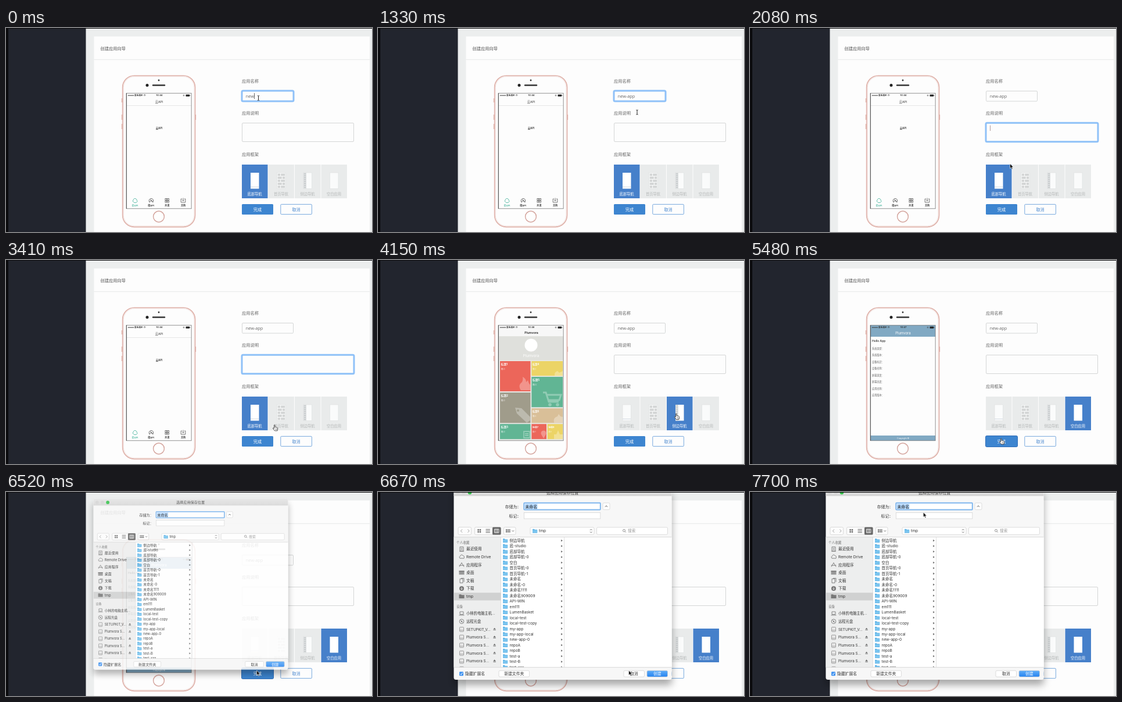
An HTML page for the animation above (8 s loop, 630x351 px).

```html
<!DOCTYPE html>
<html lang="en">
<head>
<meta charset="utf-8">
<title>App wizard</title>
<style>
html, body { margin: 0; width: 100%; height: 100%; overflow: hidden; background: #eceeee; }
svg { display: block; width: 630px; height: 351px; }
text { font-family: Inter, "Noto Sans CJK SC", "Noto Sans CJK", "Noto Sans CJK JP", sans-serif; white-space: pre; }
.field { font-family: "Open Sans", "Noto Sans", sans-serif; }
.box { fill: #fdfdfd; stroke: #d4d6d6; stroke-width: 1; }
.glow { fill: none; stroke: #8fc1f8; stroke-width: 3; }
.tab .bg { fill: #e9ebeb; }
.tab .name { fill: #b4b7b7; }
.tab .paper { fill: #fafbfb; stroke: #dfe1e1; stroke-width: .7; }
.tab.on .bg { fill: #4680ca; }
.tab.on .name, .tab.on .paper { fill: #fff; }
.tab.on .paper { stroke: none; }
</style>
</head>
<body>
<svg id="stage" viewBox="0 0 630 351" xmlns="http://www.w3.org/2000/svg"></svg>
<script>
const LOOP = 8000;
const stage = document.getElementById('stage');

// Markup helpers; text is placed by its vertical centre.
const rect = (x, y, w, h, fill, more = '') =>
  `<rect x="${x}" y="${y}" width="${w}" height="${h}" fill="${fill}" ${more}/>`;
const circle = (x, y, r, fill, more = '') => `<circle cx="${x}" cy="${y}" r="${r}" fill="${fill}" ${more}/>`;
const text = (x, y, size, str, fill = '#555', more = '') =>
  `<text x="${x}" y="${y + size * .37}" font-size="${size}" fill="${fill}" ${more}>${str}</text>`;
const line = (d, stroke, width = 1, more = '') =>
  `<path d="${d}" fill="none" stroke="${stroke}" stroke-width="${width}" ${more}/>`;
const shape = (d, fill, more = '') => `<path d="${d}" fill="${fill}" ${more}/>`;
const group = (id, body, more = '') => `<g id="${id}" ${more}>${body}</g>`;
const MID = 'text-anchor="middle"', BOLD = 'font-weight="600"', END = 'text-anchor="end"';
const BRAND = 'Plumvora';

/* ---------- phone ---------- */
function statusBar(time) {
  let s = '';
  for (let i = 0; i < 5; i++) s += circle(210.8 + i * 2.1, 116, .85, '#333');
  return s + text(221, 116, 3.6, '星禾通讯', '#333', BOLD) +
    line('M236.8 115.4q1.8-1.6 3.6 0M237.7 116.6q.9-.8 1.8 0', '#333', .7) +
    text(264, 116, 4, time, '#222', MID + ' ' + BOLD) +
    circle(306, 116, 1, 'none', 'stroke="#444" stroke-width=".6"') +
    rect(309.5, 114.4, 6.6, 3.3, '#222', 'rx=".6"') + rect(316.5, 115.4, .8, 1.4, '#222');
}

function bottomScreen() {
  const green = '#4db6a0', grey = '#555';
  let s = rect(207, 112, 112, 199, '#fdfdfd') + statusBar('10:44') +
    text(263.5, 127, 5.2, '云API', '#333', MID) + line('M207 133.5h112', '#e2e2e2', .8) +
    text(263.5, 172, 4.4, '云API', '#333', MID + ' ' + BOLD);
  ['云API', '端API', '开发', '文档'].forEach((n, i) =>
    s += text(222 + i * 27.7, 305.3, 4.1, n, i ? '#333' : green, MID + ' ' + BOLD));
  s += line('M219.5 299.5q-2.5-1.5-.5-3.4q1-3.6 4.2-2.4q2.2 1 2 2.8q2 2 0 3l-1.4 1h-3z', green, .9);
  s += line('M247 300q-2.5-5.8 3-6.5q5.4.8 2.8 6.5l-2.8-3.2zM248 295.5l4.2 2.5', grey, .9);
  for (let i = 0; i < 4; i++)
    s += rect(274 + (i % 2) * 3.8, 293.4 + (i >> 1) * 3.8, 2.8, 2.8, 'none', `stroke="${grey}" stroke-width=".8"`);
  return s + line('M303 294h-1.8v6h7.6v-6H307M305 292.5v5M303.4 296l1.6 1.6l1.6-1.6', grey, .8);
}

function tile(x, y, w, h, fill, n, size = 4.6) {
  return rect(x, y, w, h, fill) + text(x + 1.8, y + 5, size, '标题' + n, '#fff', 'font-weight="700"') +
    text(x + 1.8, y + 13.5, size * .78, '简介', '#fff');
}

function gridScreen() {
  const red = '#ec665a', yellow = '#ecd466', green = '#61b594';
  const faint = 'opacity=".3"';
  return rect(207, 112, 112, 199, '#e9e9e6') + rect(207, 112, 112, 19, '#f7f7f7') + statusBar('10:46') +
    text(264, 125.2, 5.2, BRAND, '#222', MID + ' ' + BOLD) +
    rect(209, 131.5, 109.5, 41, '#dfe0dc') + circle(263.5, 146.5, 11, '#fff') +
    text(263.5, 164.5, 6.2, BRAND, '#fff', MID) +
    tile(210, 174, 52.5, 52, red, 1) + tile(264.3, 174, 53.7, 25.3, yellow, 4, 4.2) +
    tile(264.3, 201, 53.7, 52.3, green, 5) + tile(210, 228, 52.5, 52.4, '#a09c8b', 2) +
    tile(264.3, 255.2, 53.7, 25.2, '#d9bf98', 6, 4.2) + tile(210, 282.2, 52.5, 26, green, 3) +
    tile(264.3, 282.2, 25.7, 26, red, 7, 3.8) + tile(291.6, 282.2, 26.4, 26, yellow, 8, 3.8) +
    shape('M246 224q-6-8 2-14q2-4 1-9q6 3 6 9l3-3q1 5 4 8v9z', '#fff', faint) +
    shape('M304 199q-1-6 5-8l3 3l6-3v8z', '#fff', faint) +
    line('M284 228h5l5 16h17M290 232h25l-3 9h-19', '#fff', 3, faint) +
    circle(296, 249, 2.8, '#fff', faint) + circle(309, 249, 2.8, '#fff', faint) +
    shape('M236 254l11 1l15 15v6l-6 4l-17-16z', '#fff', faint) + circle(241, 259, 2, '#a09c8b') +
    shape('M303 280q-2-9 6-11l2-4l3 4l4 1v10z', '#fff', faint) +
    line('M251 295h10v11h-10zM253 299h6M253 302h6', '#fff', 1.8, faint) +
    shape('M285 307l-4-7a4.5 4.5 0 1 1 8 0z', '#fff', faint) +
    shape('M303 308v-8h4l3-7l3 7h5v8z', '#fff', faint);
}

function sideScreen() {
  let s = rect(207, 112, 94, 199, '#dcdddc') + rect(301, 112, 18, 199, '#fdfdfd') +
    rect(301, 112, 18, 19, '#efefef') + line('M300.8 112v199', '#aaa', 1) + statusBar('10:47') +
    line('M303.8 122.6h5.6M303.8 125h5.6M303.8 127.4h5.6', '#555', .8);
  ['首页', '频道1', '频道2', '频道3', '频道4', '频道5'].forEach((n, i) =>
    s += text(219.5, 126 + i * 14.7, 4.7, n, '#333', BOLD));
  return s;
}

function blankScreen() {
  let s = rect(207, 112, 112, 199, '#fdfdfd') + rect(207, 112, 112, 20, '#81a9c3') + statusBar('10:47') +
    text(263.5, 125.5, 6, BRAND, '#fff', MID) + text(210, 139.5, 5, 'Hello App', '#444', BOLD);
  ['系统类型：', '系统版本：', '设备标识：', '设备名称：', '屏幕宽度：', '屏幕高度：', '应用名称：', '应用版本：']
    .forEach((n, i) => s += text(210, 152 + i * 11.5, 4.2, n, '#666'));
  return s + rect(207, 302, 112, 9, '#81a9c3') + text(263.5, 306.5, 3.6, 'Copyright ©', '#fff', MID);
}

function phone() {
  const pink = '#dfb0a8';
  return line('M199.6 121v7M199.6 149v9M199.6 165v9M326.4 149v9', pink, 1.4) +
    rect(200.7, 82, 124.8, 260.3, '#fdfdfd', `rx="20" stroke="${pink}" stroke-width="1.7"`) +
    rect(202.4, 83.7, 121.4, 256.9, 'none', 'rx="18.5" stroke="#f2e4e1" stroke-width="1"') +
    circle(263, 90, 1.4, '#333') + circle(243, 98.5, 2.5, '#222') +
    line('M253 98.5h20', '#333', 2.4, 'stroke-linecap="round"') +
    circle(263, 324.5, 9.4, '#fefefe', 'stroke="#d5a69f" stroke-width="1.5"') +
    `<g clip-path="url(#screen)">` +
    [bottomScreen, gridScreen, sideScreen, blankScreen].map((f, i) => group('screen' + i, f())).join('') + '</g>' +
    rect(207.3, 112.2, 111.8, 198.6, 'none', 'stroke="#777" stroke-width=".8"') +
    line('M207.3 112v199', '#444', .9);
}

/* ---------- wizard form ---------- */
function tabs() {
  const details = x => [
    line(`M${x + 15} 273.5h14`, '#c9d2dc', .8),
    [0, 1, 2, 3, 4].map(i => rect(x + 16.3, 250.5 + i * 5.2, i % 2 ? 7 : 4.2, 4, '#d3d5d5') +
      rect(x + (i % 2 ? 24.4 : 21.6), 250.5 + i * 5.2, i % 2 ? 4.2 : 7, 4, '#d3d5d5')).join(''),
    rect(x + 15, 249, 5, 27.5, '#dcdfe0') +
      [0, 1, 2, 3, 4, 5, 6, 7].map(i => line(`M${x + 16} ${251 + i * 3.3}h3`, '#b9bdbf', .9)).join(''),
    ''];
  return ['底部导航', '首页导航', '侧边导航', '空白应用'].map((n, i) => {
    const x = 406 + i * 45.5;
    return group('tab' + i, rect(x, 235, 44.5, 58, '', 'class="bg"').replace('fill=""', '') +
      `<rect class="paper" x="${x + 15}" y="249" width="14.5" height="27.5"/>` + details(x)[i] +
      `<text class="name" x="${x + 22}" y="288" font-size="6.3" text-anchor="middle">${n}</text>`, 'class="tab"');
  }).join('');
}

function form() {
  const boxAt = (y, w, h) => `<rect class="box" x="406.5" y="${y}" width="${w}" height="${h}" rx="1.5"/>`;
  const glowAt = (id, y, w, h) => `<rect id="${id}" class="glow" x="406" y="${y}" width="${w}" height="${h}" rx="2"/>` ;
  return rect(151.5, 14.5, 474.5, 337, '#fdfdfd') + line('M151.5 54.3H626', '#e6e8e8', 1) +
    text(162.5, 35, 7.25, '创建应用向导', '#555') +
    text(406, 91, 7.25, '应用名称', '#666') + text(406, 146, 7.25, '应用说明', '#666') +
    text(406, 217, 7.25, '应用框架', '#666') +
    boxAt(108.5, 88, 17.5) + glowAt('nameGlow', 108, 89, 18) +
    boxAt(163.5, 192, 32) + glowAt('noteGlow', 163.3, 193, 32.4) +
    `<text id="name" class="field" x="412.7" y="120" font-size="7.35" fill="#666"></text>` +
    rect(0, 112, .9, 10, '#555', 'id="nameCaret"') + rect(413, 167.5, .9, 9.5, '#a78f8f', 'id="noteCaret"') +
    tabs() +
    rect(405, 302, 56, 20, '#2f6db8', 'id="okRing" rx="3"') + rect(406, 303, 54, 18, '#3d85d0', 'rx="1.5"') +
    text(433, 312, 7.2, '完成', '#fff', MID) +
    rect(472.8, 303.4, 53.6, 17.2, '#fdfdfd', 'rx="1.5" stroke="#78a9de" stroke-width="1"') +
    text(499.6, 312, 7.2, '取消', '#4a88cf', MID);
}

/* ---------- save dialog ---------- */
const FOLDERS = ['侧边导航', '底-studio', '底部导航', '底部导航-0', '空白', '首页导航-0', '首页导航-1', '未命名',
  '未命名-0', '未命名1111', '未命名909009', 'API-WIN', 'em111', 'LumenBasket', 'local-test', 'local-test-copy',
  'my-app', 'my-app-local', 'new-app-0', 'repoA', 'repoB', 'test-a', 'test-B', 'test-xxx'];
const PLACES = ['最近使用', 'Remote Drive', '应用程序', '桌面', '文稿', '下载', 'tmp'];
const DEVICES = ['小林的电脑主机...', '远程光盘', 'SETUPKIT_V...', ...Array(5).fill(BRAND + ' S...')];

const folder = (x, y) =>
  shape(`M${x} ${y - 3.3}h3l1 1.1h4.2v5.6h-8.2z`, '#62b4e6') + rect(x, y - 1.2, 8.2, 3.5, '#7cc6f0');

function placeIcon(i, y) {
  const c = '#777';
  return [
    line(`M141 ${y - 3.5}h6v7h-6zM142.5 ${y - 1}h3M142.5 ${y + 1}h3M140 ${y + 4}h8`, c, .9),
    line(`M141 ${y + 2.5}q-2.5-2.5.6-4q1.6-3.6 4.6-.8q3.2.8 1.8 4.8z`, c, .9),
    line(`M140 ${y + 3.5}l4-7l4 7M139.5 ${y + 1}h9`, c, .9),
    rect(139.5, y - 3.2, 9, 6.6, '#999') + rect(139.5, y - 3.2, 9, 1.6, c),
    line(`M141 ${y - 3}h5v7h-5zM143 ${y - 4}h5v6.5`, c, .9),
    circle(144, y, 4, c) + line(`M144 ${y - 2.2}v4M142.4 ${y + .4}l1.6 1.6l1.6-1.6`, '#fff', .8),
    shape(`M139.5 ${y - 3.3}h3.5l1 1h4.5v5.8h-9z`, c)][i];
}

function deviceIcon(i, y) {
  if (i === 0) return line(`M141 ${y - 3}h6v4.5h-6zM139.5 ${y + 3}h9`, '#777', .9);
  if (i === 1) return circle(144, y, 3.8, 'none', 'stroke="#777" stroke-width=".9"') +
    circle(144, y, 1.2, '#777') + line(`M141.5 ${y - 2.5}l5 5`, '#888', .8);
  return rect(140.5, y - 3.8, 7, 7.6, '#e8e8e8', 'rx=".8" stroke="#888" stroke-width=".8"') +
    line(`M141 ${y + 1.6}h6`, '#888', .7);
}

function dialog() {
  const edge = 'stroke="#cfcfcf" stroke-width=".7"';
  const ink = '#333';
  let s = rect(130.5, -6, 375, 329, '#f7f7f7', 'rx="4" filter="url(#shadow)"') +
    shape('M130.5 7V-2q0-4 4-4h367q4 0 4 4V7z', 'url(#bar)') +
    circle(137.5, 1, 3.2, '#d4d4d4') + circle(147.7, 1, 3.2, '#d4d4d4') + circle(158, 1, 3.2, '#35c24b') +
    text(317.5, 1, 6.9, '选择应用保存位置', '#444', MID);

  // name and tag fields
  s += text(246, 25, 6.8, '存储为：', ink, END) + text(246, 41, 6.8, '标记：', ink, END) +
    rect(251.3, 18.8, 131.5, 11.8, '#fff', 'rx="1" stroke="#80b7ee" stroke-width="2"') +
    rect(253, 20.5, 21.5, 8.6, '#b2d6fb') + text(253.4, 25, 6.9, '未命名', '#222') +
    rect(251.3, 35.4, 131.5, 10.6, '#fff', edge) +
    rect(387, 18.8, 12, 11.6, '#fff', 'rx="2" ' + edge) + line('M391 25.6l2-2l2 2', ink, .9);

  // toolbar
  s += rect(138, 60.5, 22.5, 13, '#fcfcfc', 'rx="2" ' + edge) +
    line('M145 64.3l-2.6 2.7l2.6 2.7M154.5 64.3l2.6 2.7l-2.6 2.7', '#999', .9) +
    rect(166.5, 60.5, 45, 13, '#fcfcfc', 'rx="2" ' + edge) + rect(197, 60.5, 14.5, 13, '#686868', 'rx="1.5"');
  for (let i = 0; i < 4; i++) s += rect(171.4 + (i % 2) * 3.4, 64 + (i >> 1) * 3.4, 2.4, 2.4, '#666');
  s += line('M185.5 64.3h7.4M185.5 67h7.4M185.5 69.7h7.4', '#666', 1) +
    line('M200.5 64h7.4v6h-7.4zM203 64v6M205.5 64v6', '#fff', .9) +
    rect(216.5, 60.5, 20.5, 13, '#fcfcfc', 'rx="2" ' + edge);
  for (let i = 0; i < 6; i++) s += rect(220 + (i % 3) * 2.8, 64.3 + (i >> 1 > 1 || i > 2 ? 3 : 0), 2, 2.2, '#666');
  s += line('M230.8 66.2l1.6 1.7l1.6-1.7', '#555', .8) +
    rect(262, 60.8, 110, 12.4, '#fff', 'rx="2" ' + edge) + folder(266, 67) + text(277, 67, 6.7, 'tmp', ink) +
    line('M365 65.8l1.7-1.8l1.7 1.8M365 68.3l1.7 1.8l1.7-1.8', '#555', .8) +
    rect(376.5, 60.8, 122, 12.4, '#fff', 'rx="2" ' + edge) +
    circle(423.5, 66.3, 2, 'none', 'stroke="#777" stroke-width=".8"') + line('M425 67.8l1.8 1.8', '#777', .8) +
    text(430, 67, 6.7, '搜索', '#999');

  // sidebar and columns
  s += rect(130.5, 77.5, 81, 224, '#edeeee') + rect(211.5, 77.5, 294, 224, '#fff') +
    line('M130.5 77.5h375', '#d2d2d2', .8) + line('M211.5 77.5v224M320.5 77.5v224', '#d8d8d8', .8);
  let rows = text(135, 86.5, 5.6, '个人收藏', '#777') + rect(130.5, 173.3, 81, 13.2, '#d0d1d1') +
    text(135, 196.5, 5.6, '设备', '#777');
  PLACES.forEach((n, i) => {
    const y = 98 + i * 13.6;
    rows += placeIcon(i, y) + text(152, y, 6.7, n, ink);
  });
  DEVICES.forEach((n, i) => {
    const y = 209 + i * 13.65;
    rows += deviceIcon(i, y) + text(152, y, 6.3, n, ink);
    if (i > 1) rows += shape(`M198.4 ${y}l2.2-2.6l2.2 2.6zM198.4 ${y + .9}h4.4v.9h-4.4z`, '#666');
  });
  FOLDERS.forEach((n, i) => {
    const y = 83.6 + i * 9.47;
    rows += folder(215, y) + text(226.6, y, 6.5, n, ink) + shape(`M315 ${y - 1.8}l3 1.8l-3 1.8z`, '#777');
  });
  s += `<g clip-path="url(#list)">${rows}</g>`;

  // footer
  const button = (x, w, label, fill, color) => rect(x, 307.3, w, 10.8, fill, 'rx="2" ' + edge) +
    text(x + w / 2, 312.8, 6.8, label, color, MID);
  return s + line('M130.5 301.7h375', '#d2d2d2', .8) +
    rect(140, 309.2, 7, 7, '#3f92f0', 'rx="1.3"') + line('M141.6 312.8l1.5 1.7l2.6-3.7', '#fff', 1) +
    text(150, 312.8, 6.8, '隐藏扩展名', ink) +
    button(208, 52.5, '新建文件夹', '#fff', ink) + button(423, 35.5, '取消', '#fff', ink) +
    button(463, 35.5, '创建', 'url(#blue)', '#fff');
}

/* ---------- pointer ---------- */
const pointers =
  group('ibeam', line('M-1.6-4q1.6 0 1.6 1v6q0 1 1.6 1M1.6-4Q0-4 0-3M-1.6 4Q0 4 0 3', '#222', 1)) +
  group('arrow', shape('M0 0v8.2l1.9-1.7l1.4 3l1.4-.7l-1.4-2.8h2.6z', '#111', 'stroke="#fff" stroke-width=".6"')) +
  group('hand', shape('M-.4 0q1-.8 1.5.4v3l3.6.8q1.2.4 1 1.8l-.6 3.8h-4.6l-3-4q-.1-1.2 1.1-.9l1 1z',
    '#fff', 'stroke="#222" stroke-width=".8"') + line('M2.2 6v2.2M3.7 6v2.2', '#333', .6));

stage.innerHTML = `<defs>
  <clipPath id="screen"><rect x="207" y="112" width="112.3" height="199"/></clipPath>
  <clipPath id="list"><rect x="130.5" y="77.5" width="375" height="224"/></clipPath>
  <linearGradient id="bar" x2="0" y2="1"><stop stop-color="#e6e6e6"/><stop offset="1" stop-color="#d6d6d6"/></linearGradient>
  <linearGradient id="blue" x2="0" y2="1"><stop stop-color="#5fadf8"/><stop offset="1" stop-color="#2583f0"/></linearGradient>
  <filter id="shadow" x="-10%" y="-10%" width="120%" height="125%">
    <feDropShadow dx="0" dy="9" stdDeviation="6.5" flood-color="#000" flood-opacity=".34"/></filter></defs>` +
  rect(0, 0, 630, 351, '#eceeee') + form() + phone() +
  rect(0, 0, 137.5, 351, '#22252e') + line('M137.5 0v351', '#8b8e92', .6) +
  group('dialog', dialog()) +
  rect(0, 0, 4, 351, '#0b0b0d') + rect(0, 0, 630, 1, '#0b0b0d') + group('pointer', pointers);

/* ---------- timeline: [start, value...] holds until the next entry ---------- */
const NAME = [[0, 'new'], [440, 'new-'], [590, 'new-a'], [890, 'new-app']];
const NAME_CARET = [[0, 1], [140, 0], [440, 1], [1330, 0]];
const NOTE_CARET = [[0, 0], [1780, 1], [2380, 0], [2830, 1], [3260, 0]];
const TAB = [[0, 0], [3850, 1], [4150, 2], [4740, 3]];
const SCREEN = [[0, 0], [4000, 1], [4300, 2], [4890, 3]];
const POINTER = [
  [0, 'ibeam', 434.5, 120.5], [1330, 'ibeam', 446, 145], [1480, 'ibeam', 452, 174],
  [1930, 'arrow', 451, 211], [2080, 'arrow', 447.5, 233.5],
  [2680, 'hand', 449, 246], [2830, 'hand', 455, 272], [2980, 'arrow', 464, 302], [3120, 'arrow', 467, 312],
  [3260, 'arrow', 465, 300], [3410, 'hand', 462, 284], [3560, 'hand', 466, 279], [3710, 'hand', 470, 274],
  [4000, 'hand', 486, 270], [4150, 'hand', 513, 264.5], [4740, 'hand', 559, 269],
  [5040, 'hand', 513, 286], [5190, 'hand', 446, 308], [5480, 'hand', 432, 307.3],
  [6220, 'arrow', 431.5, 307], [7260, 'arrow', 302, 34], [7560, 'arrow', 300, 34.5], [7700, 'arrow', 298.3, 35]];

const at = (track, t) => track.reduce((hit, key) => key[0] <= t ? key : hit);
const $ = id => document.getElementById(id);
const show = (id, on) => $(id).setAttribute('display', on ? 'inline' : 'none');

function draw(t) {
  $('name').textContent = at(NAME, t)[1];
  $('nameCaret').setAttribute('x', 412.9 + $('name').getComputedTextLength());
  show('nameCaret', at(NAME_CARET, t)[1]);
  show('noteCaret', at(NOTE_CARET, t)[1]);
  show('nameGlow', t < 1780);
  show('noteGlow', t >= 1780 && t < 3850);
  show('okRing', t >= 5480);

  const tab = at(TAB, t)[1], screen = at(SCREEN, t)[1];
  for (let i = 0; i < 4; i++) {
    $('tab' + i).setAttribute('class', i === tab ? 'tab on' : 'tab');
    show('screen' + i, i === screen);
  }

  const opening = t < 6670;
  show('dialog', t >= 6520);
  $('dialog').setAttribute('transform', opening ? 'translate(318 159) scale(.893) translate(-318 -159)' : '');
  $('dialog').setAttribute('opacity', opening ? .87 : 1);

  const [, kind, x, y] = at(POINTER, t);
  $('pointer').setAttribute('transform', `translate(${x} ${y})`);
  for (const k of ['ibeam', 'arrow', 'hand']) show(k, k === kind);
}

function tick() {
  draw(performance.now() % LOOP);
  requestAnimationFrame(tick);
}
tick();
</script>
</body>
</html>
```
